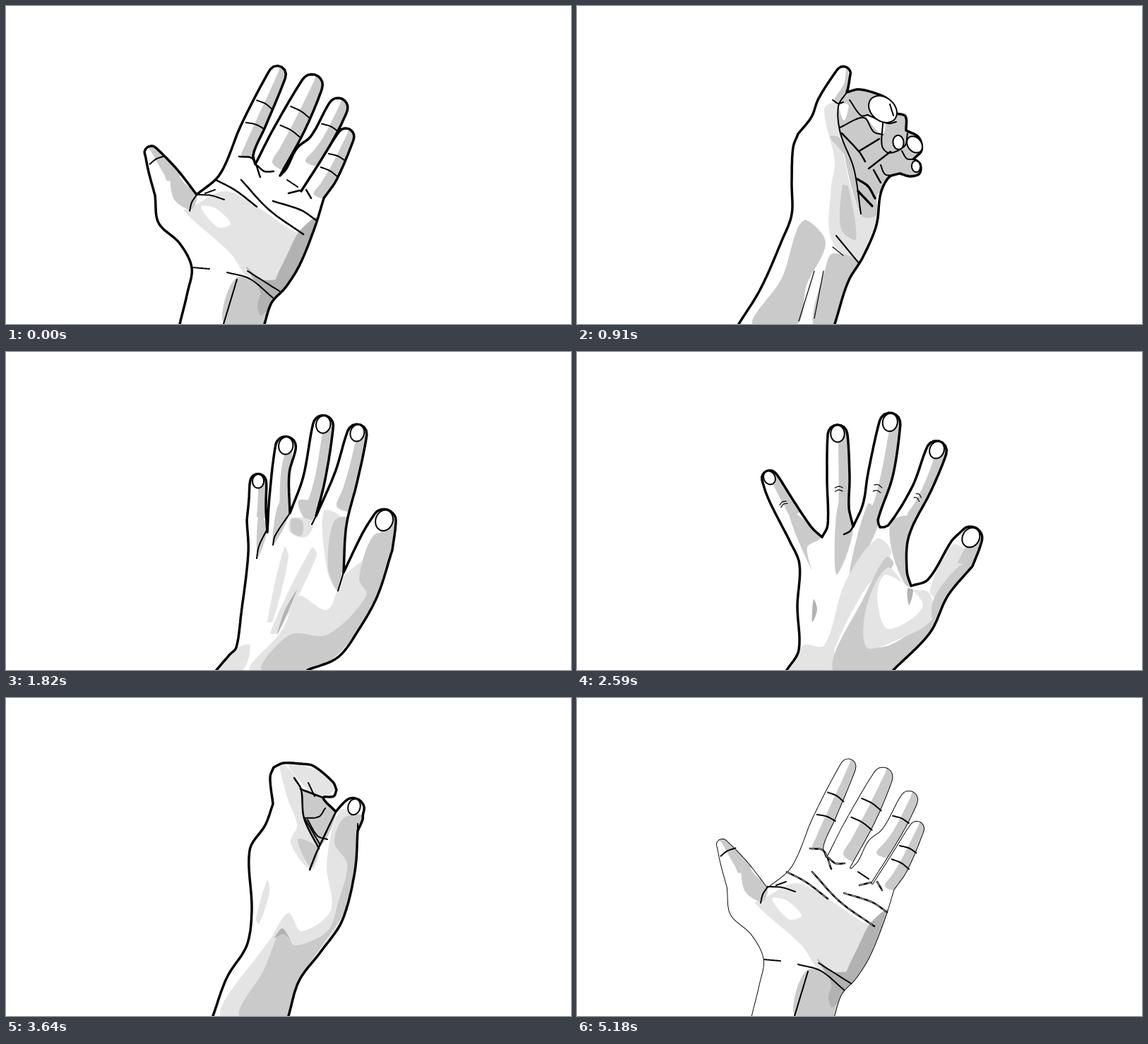
Recreate the animation shown at these times as an HTML page. Size 800 by 450 pixels, loop 5.25 s.

```html
<!DOCTYPE html>
<html lang="en">
<head>
<meta charset="utf-8">
<title>Turning hand</title>
<style>
html, body { margin: 0; width: 100%; height: 100%; overflow: hidden; background: #fff; }
svg { display: block; width: 100vw; height: 100vh; }
</style>
</head>
<body>
<svg viewBox="0 0 800 450">
  <defs><clipPath id="inside"><path id="mask"/></clipPath></defs>
  <g id="hand" stroke-linecap="round" stroke-linejoin="round"></g>
</svg>
<script>
// A pose is a rim of seven parts: side, five digits, side.
// A digit reads "left edge | tip centre and radius | right edge"; folded ones are plain curves.
// Shades: a light, b mid, c deep, w white. Lines: t thin, l normal, h heavy, m bold, n nail.
const poses = [
  { at: 0, creases: [1, 2, 2, 1, 2], shaded: 1.7,
    rim: [
      '246,450 257,405 263,370 246,336 216,307 211,268',
      '211,268 202,235 | 206,208 10 | 242,231 270,267',
      '270,267 303,238 333,168 | 384,97 12.5 | 367,171 350,210 353,224',
      '353,224 378,175 | 433,112 15.5 | 422,178 388,240',
      '388,240 397,230 412,201 432,184 | 470,144 14 | 460,195 418,262',
      '418,262 443,223 | 481,185 12 | 468,246 450,272',
      '450,272 437,314 416,366 396,398 376,420 366,450'],
    shade: [
      'a 262,285 310,262 355,284 421,323 440,295 400,395 345,386 318,350 252,290',
      'w 276,284 296,286 318,308 300,313',
      'b 234,228 252,250 270,268 262,288 237,272',
      'c 440,300 407,384 380,396 400,348 416,318',
      'b 327,384 380,408 366,450 308,450',
      'c 340,369 362,387 400,389 362,438 356,425 360,404'],
    ink: [
      'h 330,213 349,216 360,242', 'h 356,226 366,234 379,234', 'l 398,246 413,256',
      'h 400,265 416,261', 'h 425,260 432,272', 'l 270,267 263,278 260,290',
      'l 270,267 290,268 309,274', 'l 282,265 296,260', 'h 297,246 325,261 355,284',
      'h 333,246 372,288 421,323', 'h 378,276 418,289 439,303', 'l 265,370 288,372',
      'l 313,377 345,386 378,413', 'l 342,375 388,404', 'l 327,387 308,450'] },
  { at: 630, creases: [1, 2, 1, 1, 1], shaded: 1.2,
    rim: [
      '231,450 265,370 276,325 262,273 240,232 242,200',
      '242,200 243,165 | 262,128 16 | 287,160 286,185 294,217',
      '294,217 317,180 352,126 | 408,92 14 | 394,131 368,168 359,193',
      '359,193 372,172 388,142 | 431,143 15.5 | 415,166 404,178 394,206',
      '394,206 409,178 425,164 | 461,169 15.5 | 445,189 430,203 421,232',
      '421,232 433,212 445,196 | 468,200 12 | 464,228 448,258',
      '448,258 434,300 412,350 382,392 365,450'],
    shade: [
      'a 286,238 318,210 370,250 434,285 424,325 398,368 345,345 337,322 304,285',
      'b 303,204 322,181 395,206 446,262 441,277 378,252 345,208',
      'b 262,164 284,163 296,212 330,212 281,244 264,205',
      'b 432,290 437,300 396,373 380,360 420,315',
      'b 284,322 300,338 292,345',
      'b 327,358 384,380 366,450 305,450',
      'c 362,350 388,376 375,392 368,380'],
    ink: [
      't 242,205 245,135 275,113', 'l 323,181 340,179 356,186', 'l 358,186 388,204 410,208 446,262',
      'm 294,217 302,208 330,212 360,250', 'm 339,206 374,249 408,270 432,293',
      'm 386,249 422,262 444,275', 'n 434,140 442,134', 'n 465,162 474,163', 'n 473,197 478,204',
      'l 323,341 362,359 384,378', 'l 349,341 394,373', 'l 327,358 305,446'] },
  { at: 910, creases: [], shaded: 0,
    rim: [
      '229,450 260,400 290,332 304,295 304,250 306,200 313,181',
      '313,181 332,157 342,131 | 377,96 10.5 | 384,115 382,122',
      '382,122 400,118 432,127 444,136 451,152',
      '451,152 465,156 466,176',
      '466,176 484,186 488,204 477,216',
      '477,216 486,224 485,237 472,241 457,237',
      '457,237 442,242 430,265 424,310 405,355 384,390 365,450'],
    shade: [
      'a 350,145 370,138 373,190 402,294 428,290 400,362 360,330 360,255 365,220',
      'b 370,148 383,118 443,132 490,190 485,242 427,265 424,296 402,296 372,180',
      'w 371,140 384,140 378,162', 'w 410,156 436,166 432,182',
      'b 382,85 385,118 376,138 364,134 378,110',
      'b 376,254 384,256 395,330 374,316',
      'b 358,185 372,187 394,248 378,210',
      'b 325,303 352,335 325,395 312,450 248,450 290,385 312,315',
      'b 362,350 400,365 366,450 334,450 352,370'],
    ink: [
      'l 382,122 370,142 373,180 392,230 402,294', 'l 362,133 370,138 377,136', 'l 386,133 402,155 412,154',
      'l 372,172 406,158 420,178 433,182', 'l 411,154 440,166 452,164',
      'l 433,166 432,198 442,208 464,198 468,180', 'n 433,146 450,160', 'l 443,139 448,155',
      'n 455,193 456,203', 'n 478,196 486,206', 'n 480,227 481,235', 'l 460,205 467,216 478,217',
      'l 430,225 436,238 448,240', 'h 444,206 413,230', 'h 375,180 400,207 408,220',
      'h 400,205 428,188', 'm 397,245 412,255 422,272', 'm 398,262 418,283', 'h 420,232 430,250',
      'l 367,325 400,365', 't 362,341 377,353', 't 336,375 314,446', 't 349,375 336,442'] },
  { at: 1260, creases: [], shaded: 0,
    rim: [
      '293,450 313,395 341,350 348,300 345,215 367,180 378,150',
      '378,150 374,112 379,98',
      '379,98 393,92 418,93',
      '418,93 435,96 463,119 468,130',
      '468,130 464,139 449,141 467,161',
      '467,161 | 491,158 16.5 | 505,172 498,188',
      '498,188 494,245 476,315 445,360 415,400 400,450'],
    shade: [
      'a 388,92 414,118 443,212 432,243 403,205 412,180 398,140',
      'a 400,92 449,107 467,128 440,138 408,108',
      'b 420,130 456,145 468,162 443,210 420,160',
      'b 413,200 441,212 432,240',
      'a 472,160 500,165 498,230 470,330 400,450 303,450 375,340 400,304 418,330 460,300 454,235',
      'b 478,170 505,168 490,280 415,400 400,450 330,450 365,385 390,330 408,350 455,330 470,290 483,235 465,205',
      'a 370,258 373,275 358,320 354,312', 'c 380,340 392,326 406,352 394,334'],
    ink: [
      'h 467,161 440,218 430,243', 'h 408,113 418,130 422,170 443,213', 'l 428,120 437,139',
      'h 417,129 449,141', 'l 422,170 443,168 452,156', 'l 427,172 441,195 455,200',
      'l 424,172 445,208', 'n 493,154 496,143', 'l 498,178 498,193'] },
  { at: 1820, creases: [], shaded: 1.7, nails: true,
    rim: [
      '298,450 316,429 326,418 333,370 343,285 341,238',
      '341,238 344,208 | 357,184 11.5 | 368,220 370,255',
      '370,255 373,205 | 396,134 14.5 | 401,172 402,228',
      '402,228 421,176 | 449,104 14.5 | 452,180 439,232',
      '439,232 466,170 | 497,116 14 | 497,185 482,245 478,312',
      '478,312 504,258 | 535,240 17.5 | 547,280',
      '547,280 526,345 500,392 470,432 427,450'],
    shade: [
      'b 358,230 370,250 356,290', 'b 386,215 401,228 378,272',
      'b 414,210 440,215 438,234 424,238', 'a 450,225 480,240 478,312 470,338 455,310',
      'b 464,240 484,235 478,312 470,338 456,305',
      'a 404,235 435,240 425,262 402,255', 'b 405,236 420,240 418,260 404,254',
      'a 394,276 400,290 378,380 370,382', 'a 433,277 440,288 385,397 374,397',
      'a 418,345 455,365 478,318 520,285 552,260 526,345 430,450 345,450 390,395 410,350',
      'b 521,259 549,262 526,345 455,440 362,450 402,400 455,400 510,345 500,320',
      'c 412,337 384,400 395,365', 'a 325,420 345,415 335,450 300,450'],
    ink: ['l 370,250 358,275 355,292', 'l 402,228 381,260 378,273', 'l 440,230 433,244', 'l 478,312 470,338'] },
  { at: 2310, creases: [], shaded: 1.8, nails: true, knuckles: true,
    rim: [
      '297,450 314,422 312,360 315,300 300,265',
      '300,265 272,210 | 273,179 11.5 | 305,208 332,248 347,262',
      '347,262 355,245 354,180 | 369,117 14 | 386,178 385,220 391,247',
      '391,247 405,215 412,172 | 443,101 15 | 447,176 426,238 429,248',
      '429,248 440,246 475,190 | 509,140 14.5 | 502,195 470,260 467,310 473,331',
      '473,331 497,322 530,268 | 557,264 17 | 560,303',
      '560,303 525,345 500,397 448,450'],
    shade: [
      'b 300,225 345,262 326,276 332,308', 'b 370,215 391,250 367,315',
      'b 412,215 428,240 386,318', 'b 445,240 476,235 470,333 448,290',
      'a 425,264 445,285 405,340 365,420 365,450 298,450 320,415 350,415 380,325',
      'b 438,290 448,300 410,365 430,418 515,370 450,450 362,450 410,340',
      'a 440,305 470,335 498,340 503,378 452,408 410,418 410,360',
      'w 425,345 438,315 490,358 440,392',
      'a 533,272 562,303 508,348 500,335',
      'b 540,304 563,300 505,378 505,350',
      'c 335,350 340,365 333,382', 'c 468,335 476,337 470,358'],
    ink: ['h 391,247 386,254 378,258'] }
];

const LOOP = 5250, STEP = 70, MID = 2450, OPEN = 4900, WORN = 5040, SAMPLES = 64;
const fills = { a: '#e4e4e4', b: '#cacaca', c: '#b2b2b2', w: '#fff' };
const widths = { t: 1.2, l: 2, h: 2.5, m: 3.3, n: 2 };
const mask = document.getElementById('mask');
const hand = document.getElementById('hand');

const parse = s => s.trim().split(' ').map(p => p.split(',').map(Number));
const mix = (a, b, k) => [a[0] + (b[0] - a[0]) * k, a[1] + (b[1] - a[1]) * k];
const dist = (a, b) => Math.hypot(a[0] - b[0], a[1] - b[1]);
const polar = (c, r, angle) => [c[0] + r * Math.cos(angle), c[1] + r * Math.sin(angle)];
const heading = (a, b) => Math.atan2(b[1] - a[1], b[0] - a[0]);
const toPath = (pts, closed) =>
  'M' + pts.map(p => p[0].toFixed(1) + ' ' + p[1].toFixed(1)).join('L') + (closed ? 'Z' : '');

// Smooth curve through unevenly spaced points
function spline(pts, closed) {
  const n = pts.length, out = [];
  const get = i => pts[closed ? (i + n) % n : Math.max(0, Math.min(n - 1, i))];
  const slope = (i, j) => {
    const p = get(i - 1), q = get(i), r = get(i + 1);
    return (r[j] - p[j]) / (dist(p, q) + dist(q, r) || 1);
  };
  for (let i = 0; i < (closed ? n : n - 1); i++) {
    const a = get(i), b = get(i + 1), h = dist(a, b);
    for (let t = 0; t < 1; t += 0.125) {
      const e = t * t * (3 - 2 * t), s = 1 - t;
      out.push([0, 1].map(j => a[j] + (b[j] - a[j]) * e +
        h * t * s * (slope(i, j) * s - slope(i + 1, j) * t)));
    }
  }
  if (!closed) out.push(pts[n - 1]);
  return out;
}

// Evenly spaced points along a polyline
function resample(pts) {
  const len = [0];
  for (let i = 1; i < pts.length; i++) len.push(len[i - 1] + dist(pts[i], pts[i - 1]));
  const total = len[len.length - 1], out = [];
  for (let s = 0, i = 0; s < SAMPLES; s++) {
    const d = total * s / (SAMPLES - 1);
    while (i < pts.length - 2 && len[i + 1] < d) i++;
    out.push(mix(pts[i], pts[i + 1], (d - len[i]) / (len[i + 1] - len[i] || 1)));
  }
  return out;
}

function oval(c, tip, ratio) {
  const r = dist(c, tip), turn = heading(c, tip);
  return Array.from({ length: 10 }, (_, i) => {
    const a = i * Math.PI / 5, x = r * Math.cos(a), y = r * ratio * Math.sin(a);
    return [c[0] + x * Math.cos(turn) - y * Math.sin(turn), c[1] + x * Math.sin(turn) + y * Math.cos(turn)];
  });
}

// Builds a rim part; a digit gets a round tip and remembers its axis
function shape(text) {
  if (!text.includes('|')) return { pts: resample(spline(parse(text))) };
  const [left, [tip, [r]], right] = text.split('|').map(parse);
  const knuckle = mix(left[left.length - 1], right[0], 0.5), dir = heading(knuckle, tip);
  const cap = [-2, -1, 0, 1, 2].map(i => polar(tip, r, dir + i * Math.PI / 4));
  const pts = resample(spline([...left, ...cap, ...right]));
  const end = cap[2];
  const top = pts.reduce((best, p, i) => dist(p, end) < dist(pts[best], end) ? i : best, 0);
  return { pts, tip, r, dir, knuckle, end, top };
}

// Both edges of a digit; f runs from tip centre (0) to knuckle (1) and on
function across(d, f) {
  const q = mix(d.tip, d.knuckle, f);
  const near = list => list.reduce((a, b) => dist(a, q) < dist(b, q) ? a : b);
  return [near(d.pts.slice(0, d.top)), near(d.pts.slice(d.top))];
}

function sideShade(d, reach) {
  const rows = Array.from({ length: 6 }, (_, i) => across(d, reach * i / 5));
  return { kind: 'b', pts: [d.end, ...rows.map(r => r[1]), ...rows.reverse().map(r => mix(r[0], r[1], 0.52))] };
}

function crossLine(d, f, from, to, kind) {
  const [a, b] = across(d, f), mid = mix(a, b, (from + to) / 2);
  return { kind, pts: [mix(a, b, from), polar(mid, 2, d.dir), mix(a, b, to)] };
}

function mark(row) {
  const kind = row[0], pts = parse(row.slice(2));
  return { kind, pts: kind === 'n' ? oval(pts[0], pts[1], 0.75) : pts };
}

for (const p of poses) {
  const parts = p.rim.map(shape);
  p.edge = parts.flatMap(s => s.pts);
  p.shade = p.shade.map(mark);
  p.ink = p.ink.map(mark);
  parts.slice(1, 6).forEach((d, i) => {
    if (!d.tip) return;
    if (p.shaded) p.shade.push(sideShade(d, p.shaded));
    for (let c = 0; c < (p.creases[i] || 0); c++) p.ink.push(crossLine(d, 0.58 + 0.42 * c, 0.15, 1, 'l'));
    if (p.nails) p.ink.push({ kind: 'n', pts: oval(polar(d.tip, d.r * 0.1, d.dir), polar(d.tip, d.r * 0.95, d.dir), 0.82) });
    if (p.knuckles && i < 4) for (const f of [1.2, 1.3]) p.ink.push(crossLine(d, f, 0.35, 0.7, 't'));
  });
}

// Carries inner points along with the moving rim
function warp(pts, from, to) {
  if (from === to) return pts;
  return pts.map(([x, y]) => {
    let dx = 0, dy = 0, sum = 0;
    for (let i = 0; i < from.length; i += 4) {
      const [a, b] = from[i], d = (a - x) ** 2 + (b - y) ** 2 + 4, w = 1 / (d * d);
      dx += w * (to[i][0] - a);
      dy += w * (to[i][1] - b);
      sum += w;
    }
    return [x + dx / sum, y + dy / sum];
  });
}

const tag = (d, fill, stroke, width, extra = '') =>
  `<path d="${d}" fill="${fill}" stroke="${stroke}" stroke-width="${width}" ${extra}/>`;

// The hand turns over, then the same motion runs backwards and rests
function draw(t) {
  const u = Math.max(0, t < MID ? t : OPEN - t);
  let i = 0;
  while (i < poses.length - 2 && poses[i + 1].at <= u) i++;
  const a = poses[i], b = poses[i + 1];
  const k = Math.min(1, (u - a.at) / (b.at - a.at));
  const pose = k < 0.5 ? a : b;
  const edge = k === 0 || k === 1 ? pose.edge : a.edge.map((p, j) => mix(p, b.edge[j], k));
  const worn = t >= WORN;
  const curve = (m, closed) => toPath(spline(warp(m.pts, pose.edge, edge), closed), closed);
  const rim = toPath(edge), clip = 'clip-path="url(#inside)"';

  mask.setAttribute('d', rim + 'Z');
  let out = tag(rim + 'Z', '#fff', 'none', 0) + `<g ${clip}>`;
  for (const m of pose.shade) out += tag(curve(m, true), fills[m.kind], 'none', 0);
  out += '</g>' + tag(rim, 'none', '#000', 3.5, worn ? clip : '');
  if (worn) out += tag(rim, 'none', '#fff', 1.6);
  for (const m of pose.ink) {
    const nail = m.kind === 'n', d = curve(m, nail);
    out += tag(d, nail ? '#fff' : 'none', '#000', widths[m.kind]);
    if (worn && m.kind === 'h') out += tag(d, 'none', '#fff', 0.8, 'stroke-dasharray="6 6"');
  }
  hand.innerHTML = out;
}

let last = -1;
const start = performance.now();
function tick() {
  const t = Math.floor((performance.now() - start) % LOOP / STEP) * STEP;
  if (t !== last) draw(last = t);
  requestAnimationFrame(tick);
}
tick();
</script>
</body>
</html>
```
